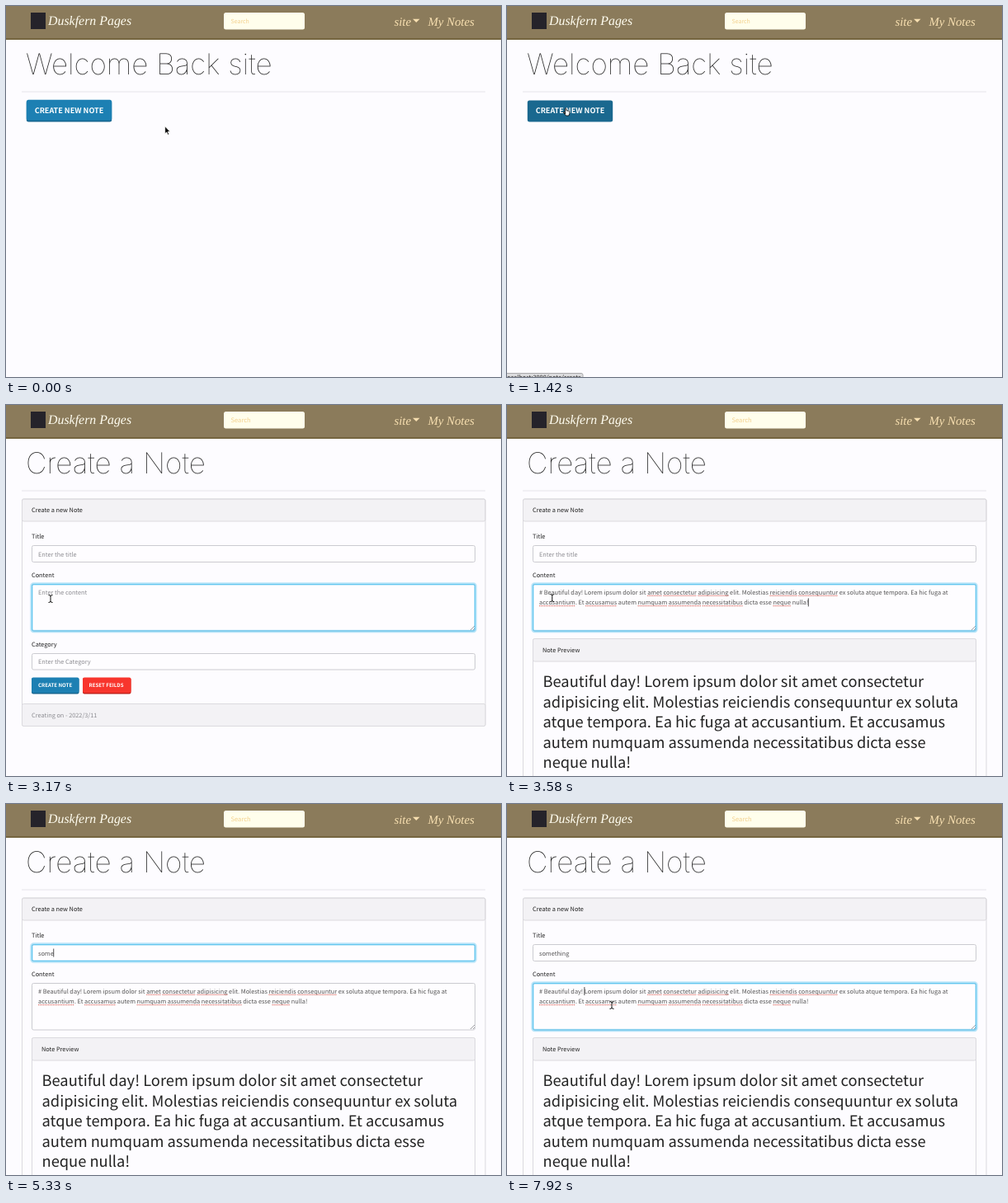
Recreate the animation shown at these times as an HTML page. Size 600 by 450 pixels, loop 8000 ms.

```html
<!DOCTYPE html>
<html lang="en">
<head>
<meta charset="utf-8">
<title>Notes</title>
<style>
html, body { margin: 0; width: 100%; height: 100%; overflow: hidden; background: #fdfcff; }
svg { display: block; width: 600px; height: 450px; }
text { font: 7.34px "Noto Sans CJK JP", "Noto Sans CJK", "Noto Sans", sans-serif; fill: #222; white-space: pre; text-rendering: geometricPrecision; }
.brand, .link { font: italic 15.9px "Liberation Serif", serif; fill: #fffdf0; }
.link { font-size: 14.8px; fill: #f7dfb0; }
.title { font: 100 35.2px Inter, Lato, sans-serif; }
.btn { font-weight: 700; font-size: 6.15px; fill: #fff; }
.big { font-size: 9.08px; }
.hint { fill: #8d8d92; }
.value { fill: #555; }
.head { font-size: 18.3px; }
#search { fill: #f3d08c; }
.card { fill: none; stroke: #dbdade; }
.cap { fill: #f3f2f5; stroke: #dbdade; }
.field { fill: #fefdff; stroke: #cbcbd0; }
.ring { fill: none; stroke: #63c6ef; }
.glow { stroke-width: 3.4; stroke-opacity: .45; }
.spell { fill: none; stroke: #d8574c; stroke-dasharray: 1.2 .8; }
</style>
</head>
<body>
<svg viewBox="0 0 600 450">
  <rect width="600" height="450" fill="#fdfcff"/>
  <rect width="600" height="40" fill="#8b7b5b"/>
  <rect y="39" width="600" height="2" fill="#75653f"/>
  <rect x="30" y="8" width="18" height="20" fill="#25232a"/>
  <text class="brand" x="51" y="23">Duskfern Pages</text>
  <rect x="264" y="8" width="98" height="20.500" rx="2.500" fill="#fffeec"/>
  <text id="search" x="272.500" y="21">Search</text>
  <text class="link" x="470.500" y="23.500">site</text>
  <path d="M493 15.700h8.500l-4.250 4.300z" fill="#f7dfb0"/>
  <text class="link" x="511.500" y="23.500">My Notes</text>
  <path d="M19 104H581" stroke="#e6e4e9"/>

  <g id="home">
    <text class="title" x="24" y="83">Welcome Back site</text>
    <rect id="edge" x="24.800" y="115" width="103.400" height="25.500" rx="2.500" fill="#166690"/>
    <rect id="face" x="24.800" y="113.800" width="103.400" height="25" rx="2.500" fill="#1d80b3"/>
    <text id="label" class="btn big" x="34.700" y="129.500">CREATE NEW NOTE</text>
    <g id="status">
      <path d="M-1 445.500H90q2 0 2 2V451H-1z" fill="#dcdcde" stroke="#a9a9ab"/>
      <text x="-2" y="453.300">localhost:3000/note/create</text>
    </g>
  </g>

  <g id="form">
    <text class="title" x="24" y="83">Create a Note</text>
    <rect class="cap" x="19.500" y="114" width="561.500" height="27" rx="2"/>
    <text x="31" y="130">Create a new Note</text>
    <text x="31" y="161.500">Title</text>
    <rect class="field" x="31.500" y="170.500" width="537" height="20" rx="2"/>
    <text x="31" y="208.500">Content</text>
    <rect class="field" x="31.500" y="217.500" width="537" height="56.500" rx="2"/>
    <path d="M563 273l5-5M566 273l2-2" stroke="#85858a" stroke-width=".8"/>
    <g id="titleRing">
      <rect class="ring glow" x="31" y="170" width="538" height="21" rx="2.500"/>
      <rect class="ring" x="31.500" y="170.500" width="537" height="20" rx="2"/>
    </g>
    <g id="noteRing">
      <rect class="ring glow" x="31" y="217" width="538" height="57.500" rx="2.500"/>
      <rect class="ring" x="31.500" y="217.500" width="537" height="56.500" rx="2"/>
    </g>
    <text id="titleHint" class="hint" x="39" y="183.500">Enter the title</text>
    <text id="titleText" class="value" x="39" y="183.500"></text>

    <g id="empty">
      <rect class="card" x="19.500" y="114" width="561.500" height="275.500" rx="2"/>
      <text class="hint" x="39" y="229.500">Enter the content</text>
      <text x="31" y="292.500">Category</text>
      <rect class="field" x="31.500" y="301.500" width="537" height="19.500" rx="2"/>
      <text class="hint" x="39" y="314">Enter the Category</text>
      <rect x="31" y="331" width="57.500" height="19.500" rx="2" fill="#166690"/>
      <rect x="31" y="330.500" width="57.500" height="18.500" rx="2" fill="#1d80b3"/>
      <text class="btn" x="39" y="341.800">CREATE NOTE</text>
      <rect x="93" y="331" width="58.500" height="19.500" rx="2" fill="#c3211b"/>
      <rect x="93" y="330.500" width="58.500" height="18.500" rx="2" fill="#f8352d"/>
      <text class="btn" x="100.500" y="341.800">RESET FEILDS</text>
      <rect class="cap" x="19.500" y="362.500" width="561.500" height="27" rx="2"/>
      <text class="hint" x="31" y="378.500">Creating on - 2022/3/11</text>
    </g>

    <g id="filled">
      <rect class="card" x="19.500" y="114" width="561.500" height="350" rx="2"/>
      <rect class="card" x="31.500" y="283.500" width="537" height="180" rx="2"/>
      <rect class="cap" x="31.500" y="283.500" width="537" height="27.500" rx="2"/>
      <text x="43" y="300">Note Preview</text>
    </g>
    <path id="caret" stroke="#222" stroke-width=".8"/>
  </g>

  <g id="cursor" stroke-linejoin="round">
    <path id="arrow" d="M-.300 0v8.800l2-1.800 1.500 3.300 1.500-.700-1.500-3.100h2.700z" fill="#000" stroke="#fff" stroke-width=".7"/>
    <path id="hand" d="M-1.500 3V-3.500q.800-1.200 1.600 0v2.500q2.500-.400 3.700 1v2.600l-1 2.400H-.500l-3.200-4q.200-1.400 1.300-.500z" fill="#fff" stroke="#000" stroke-width=".8"/>
    <g id="beam" fill="none">
      <path d="M-2.500-4.500Q0-4.500 0-3Q0-4.500 2.500-4.500M0-3V3M-2.500 4.500Q0 4.500 0 3Q0 4.500 2.500 4.500" stroke="#fff" stroke-width="2" opacity=".6"/>
      <path d="M-2.500-4.500Q0-4.500 0-3Q0-4.500 2.500-4.500M0-3V3M-2.500 4.500Q0 4.500 0 3Q0 4.500 2.500 4.500" stroke="#111"/>
    </g>
  </g>
</svg>
<script>
const $ = id => document.getElementById(id);
const show = (id, on) => $(id).style.display = on ? '' : 'none';
const ramp = (t, start) => Math.min(1, Math.max(0, (t - start) / 130));

const LOOP = 8000, HOVER = 880, OPEN = 1500, FOCUS_NOTE = 2550, PASTE = 3350,
  FOCUS_TITLE = 4000, TYPE = 4800, KEY = 170, MOVE = 6950, REFOCUS = 7740;
const WORD = 'something';
const NOTE = [
  '# Beautiful day! Lorem ipsum dolor sit amet consectetur adipisicing elit. Molestias reiciendis consequuntur ex soluta atque tempora. Ea hic fuga at',
  'accusantium. Et accusamus autem numquam assumenda necessitatibus dicta esse neque nulla!'
];
const PREVIEW = [
  'Beautiful day! Lorem ipsum dolor sit amet consectetur',
  'adipisicing elit. Molestias reiciendis consequuntur ex soluta',
  'atque tempora. Ea hic fuga at accusantium. Et accusamus',
  'autem numquam assumenda necessitatibus dicta esse',
  'neque nulla!'
];
const MISSPELT = /amet|consectetur|adipisicing|reiciendis|consequuntur|accusantium|accusamus|numquam|assumenda|necessitatibus|neque/g;

// time, x, y
const PATH = [
  [250, 193, 146], [950, 72, 128], [1500, 72, 128], [2150, 68, 238], [2400, 68, 238],
  [2800, 54, 235], [3550, 54, 235], [3950, 100, 184], [4150, 100, 190], [MOVE, 100, 190],
  [7400, 112, 249], [7720, 94, 230], [7900, 127, 244]
];

function add(tag, attrs, text = '') {
  const el = document.createElementNS('http://www.w3.org/2000/svg', tag);
  for (const k in attrs) el.setAttribute(k, attrs[k]);
  el.textContent = text;
  $('filled').append(el);
  return el;
}

PREVIEW.forEach((s, i) => add('text', { class: 'head', x: 43.5, y: 342 + i * 24.6 }, s));
const lines = NOTE.map((s, i) => {
  const y = 229.5 + i * 12.4, el = add('text', { class: 'value', x: 39, y }, s);
  for (const m of s.matchAll(MISSPELT)) {
    const x = 39 + el.getSubStringLength(0, m.index);
    add('path', { class: 'spell', d: `M${x} ${y + 1.8}h${el.getSubStringLength(m.index, m[0].length)}` });
  }
  return el;
});
const dayX = 39 + lines[0].getSubStringLength(0, 17);
const endX = 39 + lines[1].getComputedTextLength();

function position(t) {
  const i = PATH.findIndex(p => p[0] > t);
  if (i === 0) return PATH[0].slice(1);
  if (i < 0) return PATH.at(-1).slice(1);
  const [t0, x0, y0] = PATH[i - 1], [t1, x1, y1] = PATH[i];
  const u = (t - t0) / (t1 - t0), e = u * u * (3 - 2 * u);
  return [x0 + (x1 - x0) * e, y0 + (y1 - y0) * e];
}

function drawCaret(t, typed) {
  let x = 39, y = 227, since = FOCUS_NOTE;
  if (t >= REFOCUS) {
    x = dayX; since = REFOCUS;
  } else if (t >= FOCUS_TITLE) {
    y = 180.5;
    since = typed ? TYPE + (typed - 1) * KEY : FOCUS_TITLE;
    if (typed) x += $('titleText').getComputedTextLength();
  } else if (t >= PASTE) {
    x = endX; y = 239.4; since = PASTE;
  }
  $('caret').setAttribute('d', `M${x} ${y - 5}v10`);
  show('caret', t >= since && (t - since) % 1000 < 500);
}

function draw(now) {
  const t = now % LOOP, hover = t >= HOVER, open = t >= OPEN, filled = t >= PASTE;
  show('home', !open);
  show('form', open);
  $('search').style.fontSize = open ? '7.6px' : '7px';
  show('edge', !hover);
  show('status', hover);
  $('face').setAttribute('fill', hover ? '#1a688f' : '#1d80b3');
  $('face').setAttribute('y', hover ? 114.5 : 113.8);
  $('face').setAttribute('height', hover ? 26 : 25);
  $('label').setAttribute('y', hover ? 130.3 : 129.5);

  show('empty', !filled);
  show('filled', filled);
  const typed = Math.min(WORD.length, Math.max(0, Math.floor((t - TYPE) / KEY) + 1));
  $('titleText').textContent = WORD.slice(0, typed);
  show('titleHint', !typed);
  $('titleRing').setAttribute('opacity', ramp(t, FOCUS_TITLE) - ramp(t, REFOCUS));
  $('noteRing').setAttribute('opacity', ramp(t, FOCUS_NOTE) - ramp(t, FOCUS_TITLE) + ramp(t, REFOCUS));
  drawCaret(t, typed);

  const [x, y] = position(t);
  $('cursor').setAttribute('transform', `translate(${x} ${y})`);
  show('cursor', t < TYPE || t >= MOVE);
  show('arrow', !hover || open && t < 1900);
  show('hand', hover && !open);
  show('beam', t >= 1900);
  requestAnimationFrame(draw);
}
requestAnimationFrame(draw);
</script>
</body>
</html>
```
